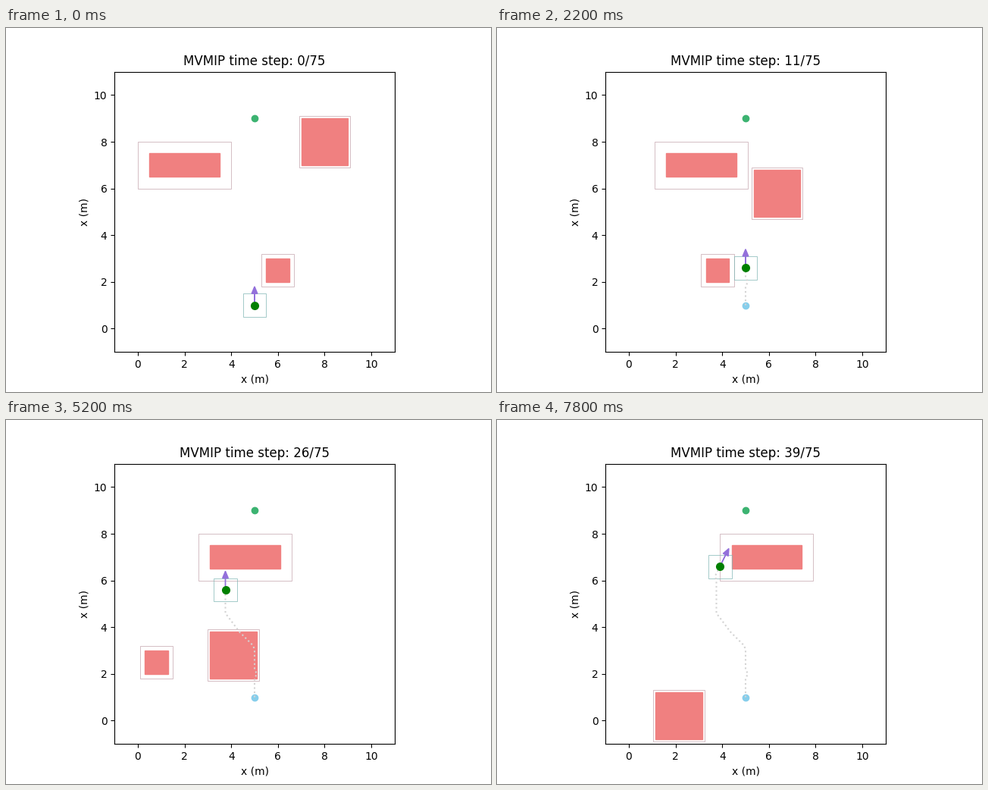
A matplotlib script that plays this animation: 640x480 px, repeating every 8 s.

```python
import numpy as np
import matplotlib.pyplot as plt
from matplotlib.animation import FuncAnimation
from matplotlib.patches import Rectangle

FRAMES, STEP_MS, TOTAL = 40, 200, 75
DT, CLIMB = 0.4, 0.2
START, GOAL = (5, 1), (5, 9)


def plan(k):
    """Climb steadily, pausing below two obstacles and dodging sideways."""
    pauses = np.clip(k - 4, 0, 3) + np.clip(k - 28, 0, 8)
    y = START[1] + CLIMB * (k - pauses)
    x = np.interp(k, [7, 8, 9, 13, 14, 17, 21, 36, 37, 40],
                  [5, 5.1, 5, 5, 4.95, 4.35, 3.75, 3.75, 3.7, 4])
    return np.column_stack([x, y])


path = plan(np.arange(FRAMES + 1))
velocity = np.diff(path, axis=0) / DT

fig, ax = plt.subplots(figsize=(6.4, 4.8), dpi=100)
ax.set(xlim=(-1, 11), ylim=(-1, 11), aspect="equal",
       xlabel="x (m)", ylabel="x (m)")
title = ax.set_title("")


class Box:
    """Rectangle placed by its centre."""

    def __init__(self, w, h, **style):
        self.half = np.array([w, h]) / 2
        self.patch = ax.add_patch(Rectangle((0, 0), w, h, **style))

    def move(self, centre):
        self.patch.set_xy(centre - self.half)


class Obstacle:
    def __init__(self, centre, size, margin, speed):
        self.centre, self.speed = np.array(centre), np.array(speed)
        w, h = size
        self.boxes = [
            Box(w, h, color="lightcoral"),
            Box(w + 2 * margin, h + 2 * margin, fill=False, ec="#c4a4ac", lw=0.5),
        ]

    def move(self, k):
        for box in self.boxes:
            box.move(self.centre + self.speed * k)


obstacles = [
    Obstacle((2, 7), (3, 1), 0.5, (0.1, 0)),
    Obstacle((6, 2.5), (1, 1), 0.2, (-0.2, 0)),
    Obstacle((8, 8), (2, 2), 0.1, (-0.15, -0.2)),
]
hull = Box(1, 1, fill=False, ec="#7fb5b3", lw=0.5)
arrow = ax.arrow(*START, 0, 0.5, width=0.001, head_width=0.25,
                 head_length=0.3, color="mediumpurple")
ax.plot(*START, "o", color="skyblue", ms=6)
ax.plot(*GOAL, "o", color="mediumseagreen", ms=6)
trail, = ax.plot([], [], ":", color="lightgray", lw=1.5)
robot, = ax.plot([], [], "o", color="green", ms=7)


def update(k):
    title.set_text(f"MVMIP time step: {k}/{TOTAL}")
    for obstacle in obstacles:
        obstacle.move(k)

    x, y = path[k]
    hull.move(path[k])
    robot.set_data([x], [y])
    trail.set_data(*path[:k + 1].T)

    vx, vy = velocity[k]
    moving = np.hypot(vx, vy) > 1e-6
    arrow.set_visible(moving)
    if moving:
        arrow.set_data(x=x, y=y, dx=vx, dy=vy)
    return []


anim = FuncAnimation(fig, update, frames=FRAMES, interval=STEP_MS,
                     init_func=lambda: update(0), repeat=True, repeat_delay=0)
plt.show()
```
